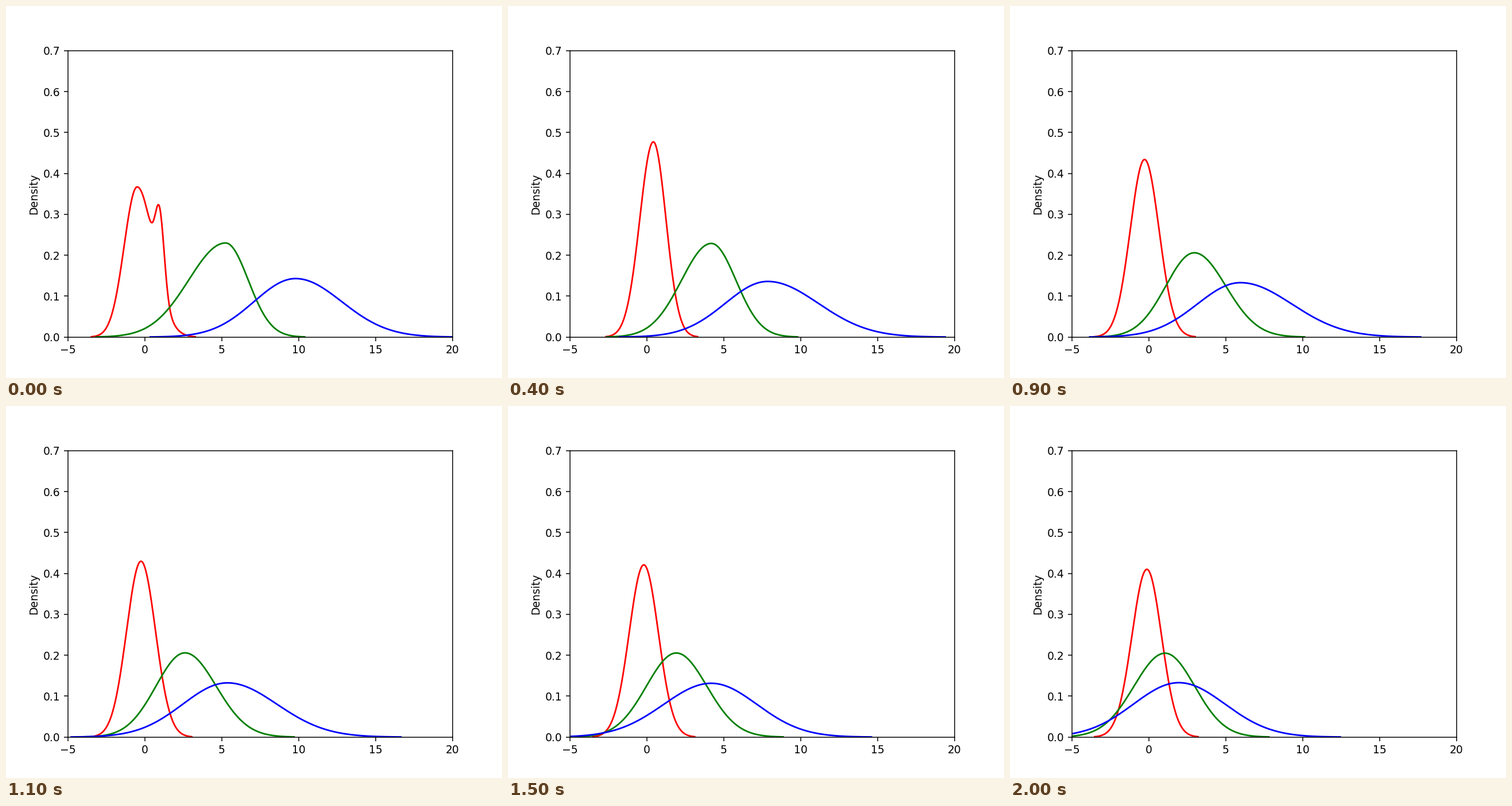
Recreate the animation shown at these times as a matplotlib script. Size 864x648 px, loop 2100 ms.

```python
import numpy as np
import matplotlib.pyplot as plt
from matplotlib.animation import FuncAnimation

FRAMES = 21
REACH = 3.5  # each curve ends this many widths from its mode

# Key poses: step, mode, peak height, left width, right width
RED = [(0, -0.5, 0.367, 0.85, 1.08), (2, 0.2, 0.69, 0.55, 0.6),
       (4, 0.42, 0.477, 0.88, 0.82), (7, -0.05, 0.408, 0.88, 1.12),
       (9, -0.28, 0.434, 0.93, 0.94), (20, -0.13, 0.41, 0.97, 0.95)]
GREEN = [(0, 5.25, 0.23, 2.4, 1.47), (7, 3.4, 0.228, 1.6, 1.7),
         (9, 2.95, 0.206, 1.85, 2.05), (20, 1.05, 0.205, 2.02, 1.93)]
BLUE = [(0, 9.8, 0.143, 2.7, 3.0), (4, 7.85, 0.136, 2.75, 3.3),
        (9, 5.95, 0.133, 2.8, 3.35), (17, 3.6, 0.131, 3.2, 2.85),
        (20, 1.95, 0.133, 2.95, 3.0)]


def pose(keys, i):
    """Mode, height and widths at step i, linear between the key poses."""
    steps, *tracks = zip(*keys)
    return [np.interp(i, steps, track) for track in tracks]


def bell(x, mode, height, left, right):
    width = np.where(x < mode, left, right)
    return height * np.exp(-((x - mode) / width) ** 2 / 2)


def density(keys, i):
    mode, height, left, right = pose(keys, i)
    x = np.linspace(mode - REACH * left, mode + REACH * right, 400)
    return x, bell(x, mode, height, left, right)


def second_peak(x, i):
    """Side peak of the red curve, gone after two steps."""
    return bell(x, 0.97, 0.17 * max(0, 1 - i / 2), 0.28, 0.3)


fig, ax = plt.subplots(figsize=(6.4, 4.8), dpi=135)
ax.set(xlim=(-5, 20), ylim=(0, 0.7), ylabel="Density")
red, green, blue = (ax.plot([], [], color=c)[0] for c in "rgb")


def draw(i):
    x, y = density(RED, i)
    red.set_data(x, y + second_peak(x, i))
    green.set_data(*density(GREEN, i))
    blue.set_data(*density(BLUE, i))
    return red, green, blue


anim = FuncAnimation(fig, draw, frames=FRAMES, interval=100,
                     repeat=True, repeat_delay=0)
plt.show()
```
